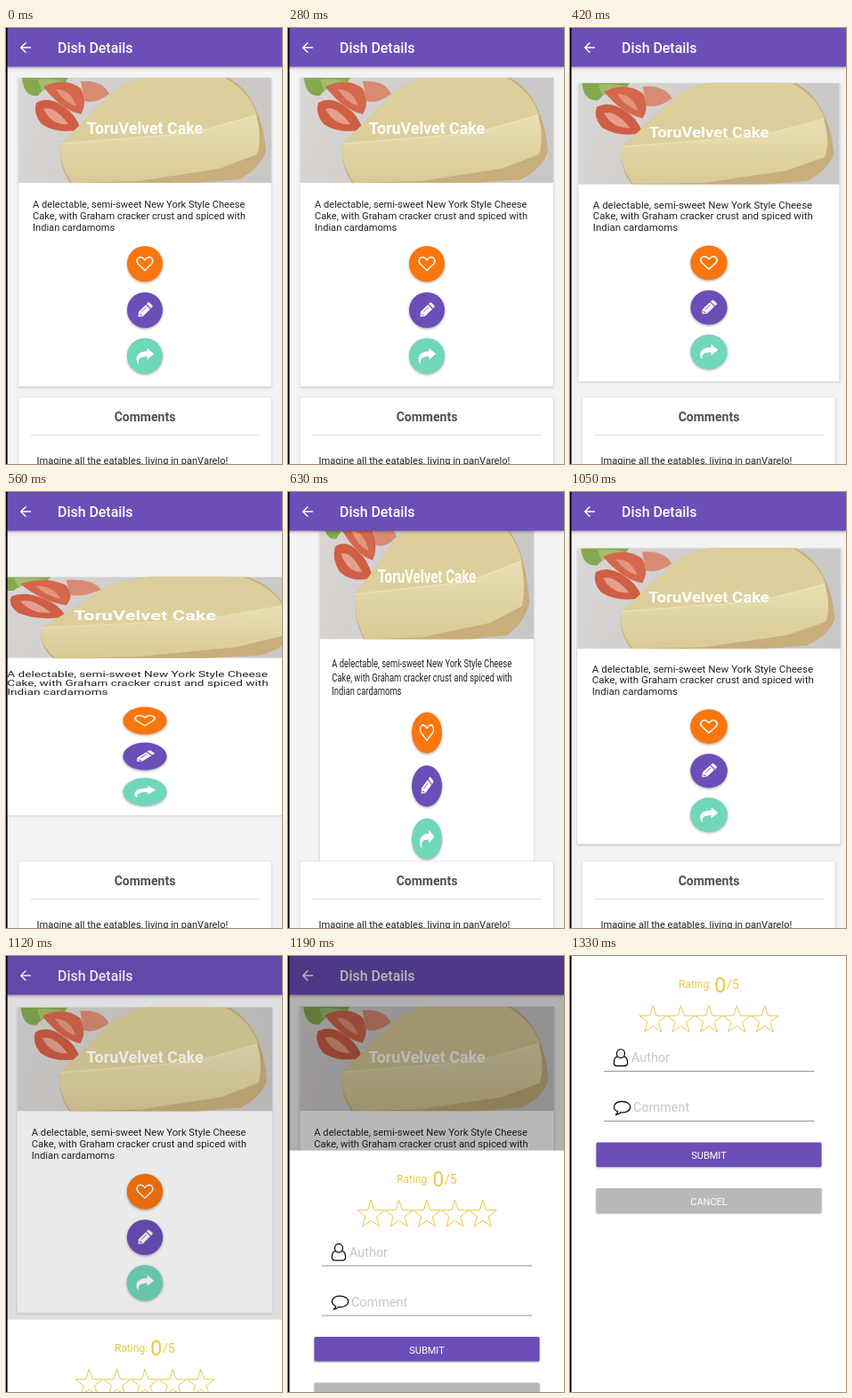
Recreate the animation shown at these times as an HTML page with a canvas. Size 310 by 490 pixels, loop 2660 ms.

```html
<!DOCTYPE html>
<html lang="en">
<head>
<meta charset="utf-8">
<title>Dish Details</title>
<style>
html, body { margin: 0; width: 100%; height: 100%; overflow: hidden; background: #fff; }
canvas { display: block; width: 310px; height: 490px; }
</style>
</head>
<body>
<canvas id="stage"></canvas>
<script>
const W = 310, H = 490, LOOP = 2660, STEP = 70;
const PURPLE = '#6b4eb8', GOLD = '#e9c944', INK = '#222';
const canvas = document.getElementById('stage');
const ctx = canvas.getContext('2d');
const dpr = window.devicePixelRatio || 1;
canvas.width = W * dpr;
canvas.height = H * dpr;

// Rubber band: [progress, horizontal scale]; vertical scale mirrors it around 1.
const BAND = [[0, 1], [.3, 1.25], [.4, .75], [.5, 1.15], [.65, .95], [.75, 1.05], [1, 1]];
const BAND_START = 360, BAND_TIME = 1050;
const STALL_FROM = 873, STALL_TO = 1100; // animation hangs while the form mounts
const SLIDE_START = 1050, SLIDE_TIME = 262;

const clamp = x => Math.min(1, Math.max(0, x));

// cubic-bezier(.25, .1, .25, 1)
function ease(x) {
  let lo = 0, hi = 1, s = .5;
  for (let i = 0; i < 24; i++) {
    s = (lo + hi) / 2;
    if (.75 * s * (1 - s) + s ** 3 < x) lo = s; else hi = s;
  }
  return .3 * s * (1 - s) ** 2 + 3 * s * s * (1 - s) + s ** 3;
}

function bandScale(t) {
  if (t > STALL_FROM && t < STALL_TO) t = STALL_FROM;
  const p = ease(clamp((t - BAND_START) / BAND_TIME));
  const i = Math.max(1, BAND.findIndex(k => k[0] >= p));
  const [p0, s0] = BAND[i - 1], [p1, s1] = BAND[i];
  return s0 + (s1 - s0) * (p - p0) / (p1 - p0);
}

function slide(t) {
  return (1 - Math.cos(Math.PI * clamp((t - SLIDE_START) / SLIDE_TIME))) / 2;
}

function rect(x, y, w, h, color) {
  ctx.fillStyle = color;
  ctx.fillRect(x, y, w, h);
}

function text(str, x, y, size, color, weight = 400, align = 'left') {
  ctx.font = `${weight} ${size}px Roboto, sans-serif`;
  ctx.textAlign = align;
  ctx.fillStyle = color;
  ctx.fillText(str, x, y);
}

function fill(d, color) {
  ctx.fillStyle = color;
  ctx.fill(new Path2D(d));
}

function stroke(d, color, width) {
  ctx.strokeStyle = color;
  ctx.lineWidth = width;
  ctx.lineJoin = ctx.lineCap = 'round';
  ctx.stroke(new Path2D(d));
}

function at(x, y, draw) {
  ctx.save();
  ctx.translate(x, y);
  draw();
  ctx.restore();
}

function shadowed(blur, dy, alpha, draw) {
  ctx.save();
  ctx.shadowColor = `rgba(0,0,0,${alpha})`;
  ctx.shadowBlur = blur * dpr;
  ctx.shadowOffsetY = dy * dpr;
  draw();
  ctx.restore();
}

function panel(x, y, w, h) {
  shadowed(2.5, 1, .25, () => rect(x, y, w, h, '#fff'));
  ctx.strokeStyle = '#e3e6ea';
  ctx.lineWidth = .8;
  ctx.strokeRect(x, y, w, h);
}

function photo() {
  ctx.save();
  ctx.beginPath();
  ctx.rect(14, 56, 284, 118);
  ctx.clip();
  const back = ctx.createLinearGradient(14, 56, 298, 174);
  back.addColorStop(0, '#d9d7d5');
  back.addColorStop(.5, '#cecbc9');
  back.addColorStop(1, '#c9c7c6');
  rect(14, 56, 284, 118, back);
  // leaves and berries
  fill('M18 56 Q20 78 36 76 Q44 64 66 62 L70 56Z', '#85a94f');
  fill('M36 58 Q50 56 66 60 Q54 68 40 70Z', '#a3bd6c');
  fill('M42 66 Q66 54 84 68 Q92 84 84 97 Q62 92 42 66Z', '#d4674c');
  fill('M34 84 Q48 76 64 88 Q78 96 84 114 Q58 120 40 108 Q30 96 34 84Z', '#cf5e45');
  fill('M42 91 Q54 87 70 108 Q52 110 42 91Z', '#e4a08c');
  fill('M56 69 Q72 68 79 88 Q66 84 56 69Z', '#e3957f');
  fill('M84 60 Q108 58 116 74 Q100 86 88 82Z', '#d98a73');
  // cake slice
  fill('M62 130 L118 74 Q136 58 170 54 L250 56 Q286 76 292 138 Q286 158 262 170 L170 178 L72 174 Q58 154 62 130Z', '#c7ae7b');
  fill('M62 130 L118 74 Q136 58 170 54 L246 56 Q274 72 282 98 L210 118Z', '#dccf9b');
  const side = ctx.createLinearGradient(0, 108, 0, 174);
  side.addColorStop(0, '#e6dcb0');
  side.addColorStop(1, '#d9ca94');
  fill('M62 130 L210 118 L281 98 Q288 124 282 142 L240 158 L150 172 L74 174 Q58 152 62 130Z', side);
  stroke('M62 130 L210 118 L281 98', 'rgba(244,236,200,.6)', 1.5);
  ctx.restore();
}

function disc(y, color, icon) {
  at(156, y, () => {
    shadowed(3, 1.2, .35, () => {
      ctx.fillStyle = color;
      ctx.beginPath();
      ctx.arc(0, 0, 20, 0, 7);
      ctx.fill();
    });
    icon();
  });
}

function heart() {
  stroke('M0 7.5 L-7.4 .3 C-10.6 -3.2 -8 -7.6 -4.6 -7.4 C-2.2 -7.2 -1 -5.6 0 -4.2 C1 -5.6 2.2 -7.2 4.6 -7.4 C8 -7.6 10.6 -3.2 7.4 .3Z', '#fff', 1.5);
}

function pencil() {
  ctx.rotate(-Math.PI / 4);
  fill('M-10.5 0 L-6.5 -3.5 L5 -3.5 L5 3.5 L-6.5 3.5Z M6.3 -3.5 H8.3 Q9.5 -3.5 9.5 -2.3 V2.3 Q9.5 3.5 8.3 3.5 H6.3Z', '#fff');
  stroke('M-4.5 -1 H3.2', PURPLE, .8);
  stroke('M-7.7 -.8 L-6.7 1.6', PURPLE, 1);
}

function share() {
  fill('M10 -2.3 L2.5 -8.7 V-5.2 C-6 -5 -9.5 -1 -9.5 3.5 Q-9.5 6 -7.8 8.5 Q-7 9 -7.1 8 C-7.6 2.4 -4.6 .8 2.5 .7 V4.2Z', '#fff');
}

function dishCard(t) {
  const s = bandScale(t);
  ctx.save();
  ctx.translate(156, 229.5);
  ctx.scale(s, 2 - s);
  ctx.translate(-156, -229.5);
  panel(14, 56, 284, 347);
  photo();
  text('ToruVelvet Cake', 156, 119, 17.8, '#fff', 700, 'center');
  ['A delectable, semi-sweet New York Style Cheese',
   'Cake, with Graham cracker crust and spiced with',
   'Indian cardamoms'].forEach((line, i) => text(line, 30, 201.7 + i * 13.1, 11.1, INK));
  disc(265, '#fb760c', heart);
  disc(317, PURPLE, pencil);
  disc(368.5, '#70d7ba', share);
  ctx.restore();
}

function comments() {
  panel(14, 415, 284, 100);
  text('Comments', 156, 441.7, 14, '#4b5056', 700, 'center');
  rect(27, 457, 258, 1, '#e1e5e9');
  text('Imagine all the eatables, living in panVarelo!', 34.5, 489.7, 11.1, INK);
}

function header() {
  shadowed(3, 1, .3, () => rect(0, 0, W, 43.5, PURPLE));
  stroke('M27.5 22 H17 M22 16.8 L16.8 22 L22 27.2', '#fff', 1.5);
  text('Dish Details', 58, 28.2, 15.9, '#fff', 500);
}

function star(x, y, r) {
  let d = '';
  for (let i = 0; i < 10; i++) {
    const a = i * Math.PI / 5, q = i % 2 ? r * .4 : r;
    d += `${i ? 'L' : 'M'}${x + q * Math.sin(a)} ${y - q * Math.cos(a)}`;
  }
  stroke(d + 'Z', GOLD, 1);
}

function field(label, x, y) {
  text(label, x, y - 10, 14.4, '#c5c6ca');
  rect(38, y, 236.5, 1, '#8f979e');
}

function button(label, y, color) {
  shadowed(2, 1, .35, () => {
    ctx.fillStyle = color;
    ctx.beginPath();
    ctx.roundRect(29.5, y, 253, 27.5, 1.5);
    ctx.fill();
  });
  text(label, 156, y + 18.6, 11, '#fff', 400, 'center');
}

function form() {
  rect(0, 0, W, H, '#fff');
  text('Rating:', 122, 36.3, 12, GOLD);
  text('0', 162.3, 40.5, 23, GOLD);
  text('/5', 176, 37.3, 14.2, GOLD);
  for (let i = 0; i < 5; i++) star(93.2 + i * 31.4, 72.2, 16.2);
  at(57, 114.5, () => stroke(
    'M-4.5 -4.8 A4.5 4.8 0 0 1 4.5 -4.8 A4.5 4.8 0 0 1 -4.5 -4.8 M-4.2 -1.4 C-7 -.6 -7.6 3 -7.6 5.6 Q-7.4 9 -4.4 9 H4.4 Q7.4 9 7.6 5.6 C7.6 3 7 -.6 4.2 -1.4', '#111', 1.3));
  field('Author', 69, 129);
  at(58.5, 170.5, () => stroke(
    'M-4.8 4.4 C-12 1 -9.6 -7 0 -7 C5.4 -7 9.2 -4.2 9.2 -.8 C9.2 3.6 4 6 -1.6 5.3 Q-4 7.8 -7.2 8 Q-5.2 6.6 -4.8 4.4Z', '#111', 1.3));
  field('Comment', 71, 185);
  button('SUBMIT', 209.5, PURPLE);
  button('CANCEL', 261, '#b8b8b8');
}

function draw(t) {
  ctx.setTransform(dpr, 0, 0, dpr, 0, 0);
  rect(0, 0, W, H, '#f3f3f4');
  dishCard(t);
  comments();
  header();
  const p = slide(t);
  if (p > 0) {
    rect(0, 0, W, H, `rgba(0,0,0,${.5 * p})`);
    at(0, H * (1 - p), form);
  }
  rect(0, 0, 1.6, H, '#000');
}

const begin = performance.now();
function tick() {
  const t = (performance.now() - begin) % LOOP;
  draw(Math.floor(t / STEP) * STEP);
  requestAnimationFrame(tick);
}
tick();
</script>
</body>
</html>
```
